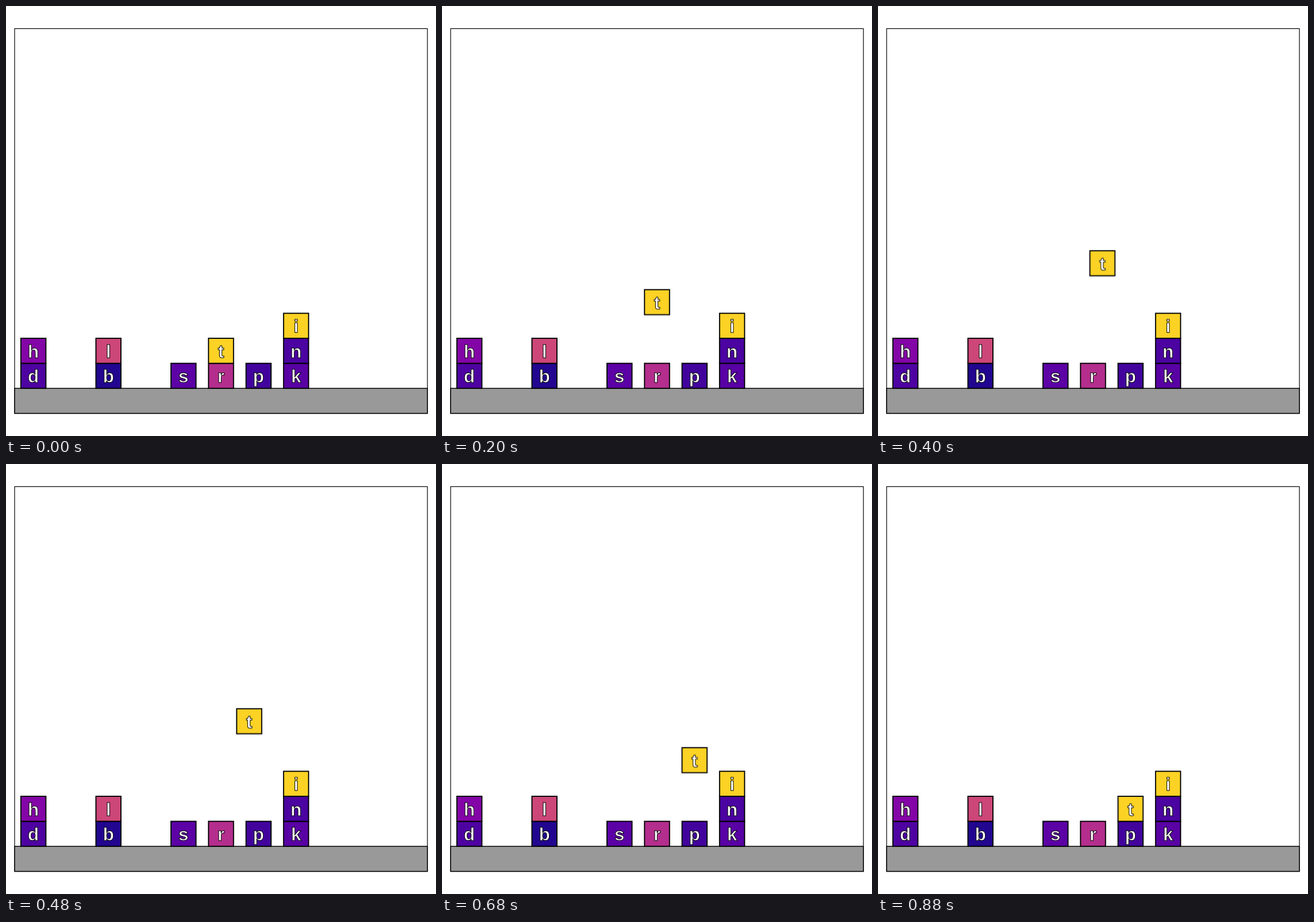
Recreate the animation shown at these times as an HTML page. Size 748 by 748 pixels, loop 920 ms.

```html
<!DOCTYPE html>
<html lang="en">
<head>
<meta charset="utf-8">
<title>Stacking blocks</title>
<style>
  html, body { margin: 0; width: 100%; height: 100%; overflow: hidden; background: #fff; }
  svg { display: block; width: 748px; height: 748px; }
  rect { stroke: #000; }
  text {
    font: bold 32px "Liberation Sans", Arial, Helvetica, sans-serif;
    text-anchor: middle;
    fill: #fff;
    stroke: #000;
    stroke-width: 1;
  }
</style>
</head>
<body>
<svg id="stage" viewBox="0 0 748 748"></svg>
<script>
const UNIT = 43.52;
const LEFT = 15;
const TOP = 39.4;
const FLOOR = 665.1;
const WIDTH = 16.5 * UNIT;
const PITCH = 1.5 * UNIT;
const LIFT = 3.5 * UNIT;

const stage = document.getElementById('stage');

function add(parent, tag, attrs) {
  const node = document.createElementNS('http://www.w3.org/2000/svg', tag);
  for (const key in attrs) node.setAttribute(key, attrs[key]);
  return parent.appendChild(node);
}

function block(letter, fill, column, row) {
  const x = LEFT + UNIT / 4 + column * PITCH;
  const y = FLOOR - (row + 1) * UNIT;
  const group = add(stage, 'g', {});
  add(group, 'rect', { x, y, width: UNIT, height: UNIT, fill, 'stroke-width': 1.9 });
  add(group, 'text', { x: x + UNIT / 2, y: y + UNIT / 2 + 12 }).textContent = letter;
  return group;
}

add(stage, 'rect', {
  x: LEFT, y: TOP, width: WIDTH, height: FLOOR + UNIT - TOP, fill: '#fff', 'stroke-width': 1.2
});
add(stage, 'rect', {
  x: LEFT, y: FLOOR, width: WIDTH, height: UNIT, fill: '#999', 'stroke-width': 1.5
});

[
  ['d', '#4e02a2', 0, 0], ['h', '#8405a7', 0, 1],
  ['b', '#220690', 2, 0], ['l', '#cc4778', 2, 1],
  ['s', '#5b01a5', 4, 0],
  ['r', '#b42e8d', 5, 0],
  ['p', '#42039d', 6, 0],
  ['k', '#5901a5', 7, 0], ['n', '#4b03a1', 7, 1], ['i', '#fcd225', 7, 2]
].forEach(args => block(...args));

const mover = block('t', '#fcd225', 5, 1);

// Up in 9 steps, across in 4, down in 9, then straight back to the start.
const UP = 9, ACROSS = 4, STEPS = 2 * UP + ACROSS + 1, STEP_MS = 40;

function pose(step) {
  const x = PITCH * Math.min(1, Math.max(0, (step - UP) / ACROSS));
  const y = -LIFT * Math.min(1, step / UP, (STEPS - 1 - step) / UP);
  return `translate(${x}px, ${y}px)`;
}

const frames = Array.from({ length: STEPS + 1 }, (_, i) => ({
  offset: i / STEPS,
  transform: pose(Math.min(i, STEPS - 1)),
  easing: 'steps(1, end)'
}));

mover.animate(frames, { duration: STEPS * STEP_MS, iterations: Infinity });
</script>
</body>
</html>
```
